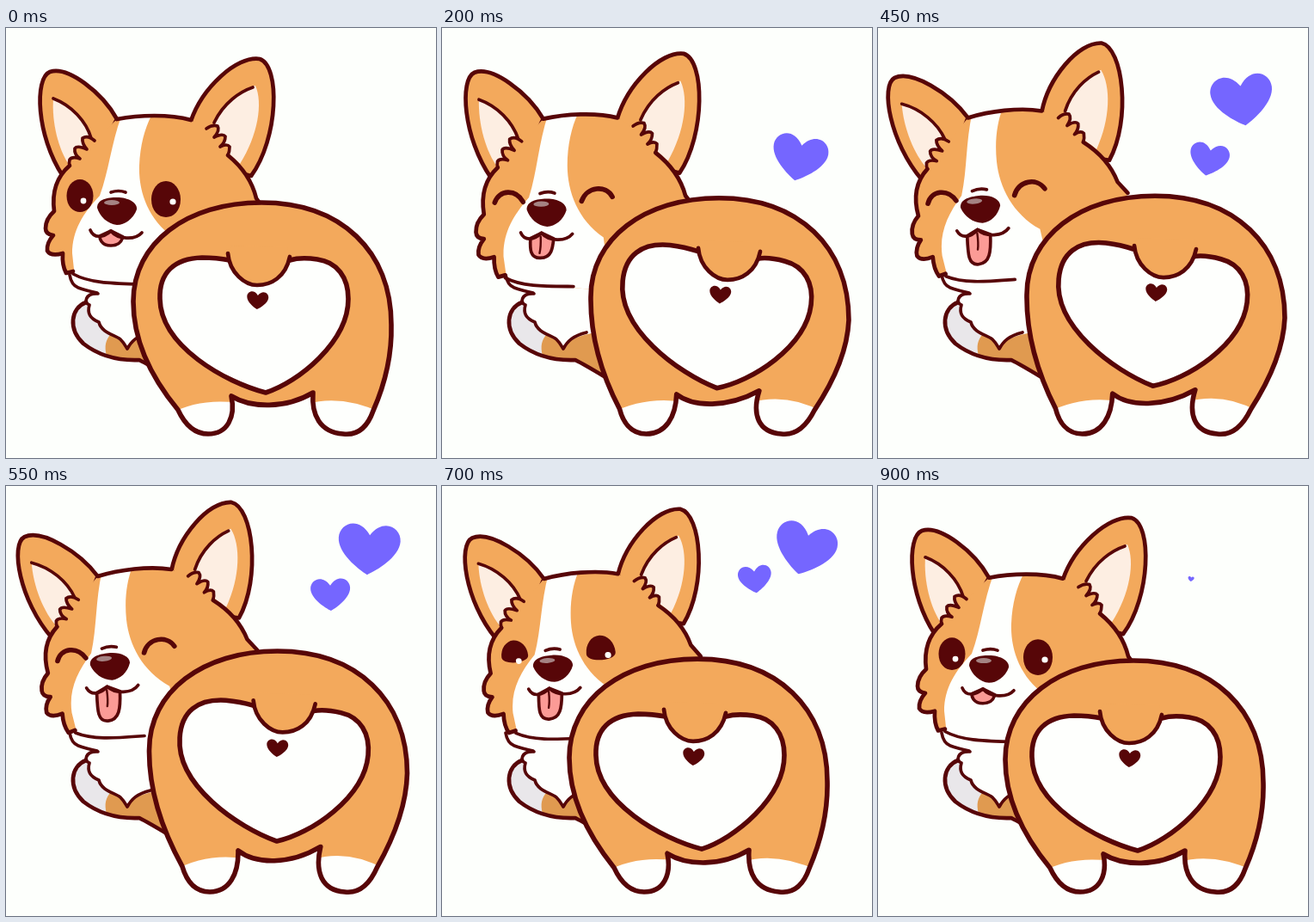
Write an HTML page that moves like this. It is 500 px wide and 500 px high and loops after 950 ms.

```html
<!DOCTYPE html>
<html lang="en">
<head>
<meta charset="utf-8">
<title>Happy corgi</title>
<style>
  html, body { margin: 0; width: 100%; height: 100%; overflow: hidden; background: #fdfffc; }
  svg { display: block; width: 100vw; height: 100vh; }
  path { fill: none; stroke-linecap: round; stroke-linejoin: round; }
  .line { stroke: #570608; stroke-width: 4.7; }
  .bold { stroke-width: 5.6; }
  .thin { stroke-width: 3.7; }
  .fine { stroke-width: 2.4; }
  .fur { fill: #f3a95c; }
  .shade { fill: #e09a50; }
  .white { fill: #fefffd; }
  .paw { fill: #e9e7ea; }
  .ear { fill: #fdeee2; }
  .dark { fill: #570608; }
  .pink { fill: #fb9b96; }
  .love { fill: #7566ff; }
</style>
</head>
<body>
<svg viewBox="0 0 500 500">
  <defs>
    <path id="heart" d="M0,.42C-.15,.34 -.5,.1 -.5,-.15C-.5,-.38 -.2,-.52 0,-.22C.2,-.52 .5,-.38 .5,-.15C.5,.1 .15,.34 0,.42Z" style="fill:inherit"/>
    <clipPath id="bodyClip"><path id="clipShape"/></clipPath>
    <clipPath id="headClip"><use href="#skull"/></clipPath>
  </defs>

  <g id="chest">
    <path class="shade" d="M93,319C75,326 72,350 90,367C108,381 130,387 155,386C165,391 175,397 190,406V340L95,315Z"/>
    <path class="paw" d="M93,319C75,326 72,350 90,367C98,374 107,378 117,381C114,370 116,362 122,356L97,320Z"/>
    <path class="white" d="M76,286L83,302L107,309C92,308 90,320 97,322C94,332 98,338 108,342C111,355 128,357 133,362C138,367 139,370 141,373C146,364 152,358 190,352V285Z"/>
    <path class="line" d="M93,319C75,326 72,350 90,367C108,381 130,387 155,386C165,391 175,397 190,406"/>
    <path class="line thin" d="M107,309C92,308 90,320 97,322C94,332 98,338 108,342C111,355 128,357 133,362C138,367 139,370 141,373C146,364 152,358 168,354"/>
  </g>

  <g id="head">
    <path class="line fur" d="M129,106C112,75 72,44 51,51C33,58 35,125 66,172L100,160Z"/>
    <path class="line fur" d="M215,108C228,70 268,32 295,36C319,44 317,128 285,172L240,160Z"/>
    <path class="ear" d="M55,82C53,110 61,142 74,160L92,145L101,131C95,110 77,90 55,82Z"/>
    <path class="ear" d="M243,110C255,85 275,70 290,67C299,87 293,125 272,158C265,150 256,145 248,132Z"/>
    <path class="line thin" d="M55,82C76,90 93,108 99,128M242,110C253,87 272,74 287,69"/>
    <path id="skull" class="fur" d="M129,106C155,101 190,100 215,107L233,117Q240,112 246,114Q249,119 242,127Q252,122 255,126Q255,133 249,138Q257,134 260,138Q260,144 258,148C274,161 286,177 291,198L301,212L270,280L180,302L152,299C125,299 98,297 78,286L70,285Q65,276 66,262Q52,266 48,259Q47,250 55,241Q46,240 46,233Q46,222 56,213C53,190 60,172 74,160Q73,157 74,153Q77,149 86,152Q79,147 80,140Q83,136 94,141Q88,134 89,128Q95,124 103,131Z"/>
    <path class="white" clip-path="url(#headClip)" d="M135,100C122,135 120,165 109,195C90,215 77,235 77,262L80,290L85,310H200L194,243C165,222 154,190 155,160C156,135 162,115 170,100Z"/>
    <path class="line" d="M129,106C155,101 190,100 215,107M258,148C274,161 286,177 291,198L301,212M74,160C60,172 53,190 56,213Q46,222 46,233Q46,240 55,241Q47,250 48,259Q52,266 66,262Q65,276 70,285L78,283"/>
    <path class="line thin" d="M233,117Q240,112 246,114Q249,119 242,127Q252,122 255,126Q255,133 249,138Q257,134 260,138Q260,144 258,148M103,131Q95,124 89,128Q88,134 94,141Q83,136 80,140Q79,147 86,152Q77,149 74,153Q73,157 74,160M78,286C98,297 125,297 157,298M122,191Q131,188 139,191"/>
    <g id="open">
      <path id="eyeL" class="dark"/><path id="eyeR" class="dark"/>
      <circle class="white" cx="90" cy="201" r="3.4"/><circle class="white" cx="194" cy="202" r="3.6"/>
    </g>
    <path id="shut" class="line bold" d="M69,200C75,185 94,185 102,200M170,201C177,184 199,183 206,197"/>
    <path id="tongue" class="line thin pink"/>
    <path id="crease" class="line fine" d="M121,240Q121,252 119,259"/>
    <path class="line thin" d="M98,235C102,245 113,244 122,236C130,246 150,247 158,238"/>
    <path class="dark" d="M106,209C106,199 118,197 129,197C142,197 153,203 152,211C148,222 138,229 129,229C118,228 109,219 106,209Z"/>
    <ellipse cx="123" cy="203" rx="9" ry="3" fill="#a58383"/>
  </g>
  <path class="line thin" d="M74,287Q76,299 84,302T106,308"/>

  <g id="rump">
    <path id="body" class="fur"/>
    <path id="socks" class="white" clip-path="url(#bodyClip)"/>
    <path id="outline" class="line bold"/>
    <path id="patch" class="line bold white"/>
    <path id="tailFill" class="fur"/>
    <path id="tail" class="line"/>
    <use id="spot" class="dark" href="#heart"/>
  </g>
  <use id="loveA" class="love" href="#heart"/>
  <use id="loveB" class="love" href="#heart"/>
</svg>

<script>
const $ = id => document.getElementById(id);
const LOOP = 950, STEP = 50;

const BODY = "M262,428C267,452 258,472 235,472C216,472 206,457 200,444C176,415 148,372 148,318C148,250 210,203 297,203C390,203 448,260 448,345C449,385 438,420 427,445C420,465 408,474 392,472C365,470 355,450 357,424C325,443 285,442 262,428Z";
const SOCKS = "M190,449Q225,430 270,436L270,490L190,490ZM350,437Q390,426 436,447L436,490L350,490Z";
const PATCH = "M302,424C255,412 180,370 179,315C178,285 195,268 228,267C240,267 250,268 260,270L330,270C340,267 355,268 362,269C385,272 398,290 398,315C398,365 340,412 302,424Z";
const TAIL = "M258,262C260,285 278,299 292,299C308,299 325,290 330,266";

// Timing helpers, all in ms.
const ease = (t, a, b) => {
  const u = Math.min(1, Math.max(0, (t - a) / (b - a)));
  return u * u * (3 - 2 * u);
};
const hold = (t, a, b, c, d) => ease(t, a, b) - ease(t, c, d);
const bump = (t, a, b) => t > a && t < b ? Math.sin(Math.PI * (t - a) / (b - a)) : 0;
const wave = (t, peak, period) => Math.cos(2 * Math.PI * (t - peak) / period);

const swayAt = t => 25 * hold(t, 0, 200, 490, 670);
const hopAt = t => -9 * bump(t, 0, 250) - 11 * bump(t, 360, 720);

const warp = (d, move) => d.replace(/(-?[\d.]+),(-?[\d.]+)/g, (_, x, y) => {
  const [dx, dy] = move(+x, +y);
  return (+x + dx).toFixed(2) + "," + (+y + dy).toFixed(2);
});

const setPath = (id, d) => $(id).setAttribute("d", d);
const place = (id, x, y, w, turn) =>
  $(id).setAttribute("transform", `translate(${x} ${y}) rotate(${turn}) scale(${w})`);
const show = (id, on) => $(id).setAttribute("visibility", on ? "visible" : "hidden");

// The lower lid rises as the eye closes.
function eye(id, x, y, rx, ry, open) {
  const low = y + 1.33 * ry * open;
  setPath(id, `M${x - rx},${y}A${rx},${ry} 0 0 1 ${x + rx},${y}C${x + rx},${low} ${x - rx},${low} ${x - rx},${y}Z`);
}

function drawRump(t) {
  const sway = swayAt(t), hop = hopAt(t), tilt = sway * .005;
  // The feet stay planted while the upper body swings.
  const planted = (x, y) => {
    const r = ease(y, 475, 360);
    return [sway * (.1 + .9 * r), hop * r];
  };
  const swing = (x, y) => [sway * .7 + (424 - y) * tilt, hop + (x - 302) * tilt];

  const d = warp(BODY, planted);
  ["body", "outline", "clipShape"].forEach(id => setPath(id, d));
  setPath("socks", warp(SOCKS, planted));
  setPath("patch", warp(PATCH, swing));
  const tail = warp(TAIL, () => [sway * 1.6, hop * 1.15]);
  setPath("tail", tail);
  setPath("tailFill", tail + "l-3,-11l-66,-2Z");
  const [dx, dy] = swing(292, 316);
  place("spot", 292.5 + dx, 316.5 + dy, 25, 4);
}

function drawHead(t) {
  const lean = hold(t, 100, 400, 600, 900);
  const x = 127 - 10 * hold(t, 0, 300, 500, 680);
  const y = 209 + 6 * bump(t, 150, 450) + .25 * hopAt(t);
  const tall = 1 + .02 * wave(t, LOOP / 4, LOOP);
  $("head").setAttribute("transform",
    `translate(${x} ${y}) rotate(${-6 * lean}) skewX(${2 * lean}) scale(1 ${tall}) translate(-127 -209)`);

  const open = 1 - hold(t, 100, 200, 640, 780);
  show("open", open > .1);
  show("shut", open <= .1);
  eye("eyeL", 86, 195, 15.5, 19, open);
  eye("eyeR", 186, 199, 17, 21, open);

  const out = 1.1 * hold(t, 100, 300, 650, 850);
  const tx = 122 - 4 * out, ty = 253 + 21 * out, side = 244 + 18 * out;
  setPath("tongue", `M109,242L122,236L136,243C${135 - out},${side} ${tx + 13},${ty} ${tx},${ty}C${tx - 12},${ty} ${109 - 2 * out},${side} 109,242Z`);
  show("crease", out > .4);
}

function drawHearts(t) {
  place("loveA",
    395 + 27 * ease(t, 50, 300) + 14 * bump(t, 180, 460),
    172 - 99 * ease(t, 50, 550),
    72 * hold(t, 0, 250, 700, 850),
    3 + 12 * wave(t, 130, 550));
  place("loveB",
    364 + 21 * bump(t, 300, 620),
    186 - 78 * ease(t, 260, 680),
    46 * hold(t, 270, 430, 600, 1000),
    11 * wave(t, 440, 400));
}

function tick() {
  const t = Math.floor((performance.now() % LOOP) / STEP) * STEP;
  drawRump(t);
  drawHead(t);
  drawHearts(t);
  requestAnimationFrame(tick);
}
tick();
</script>
</body>
</html>
```
